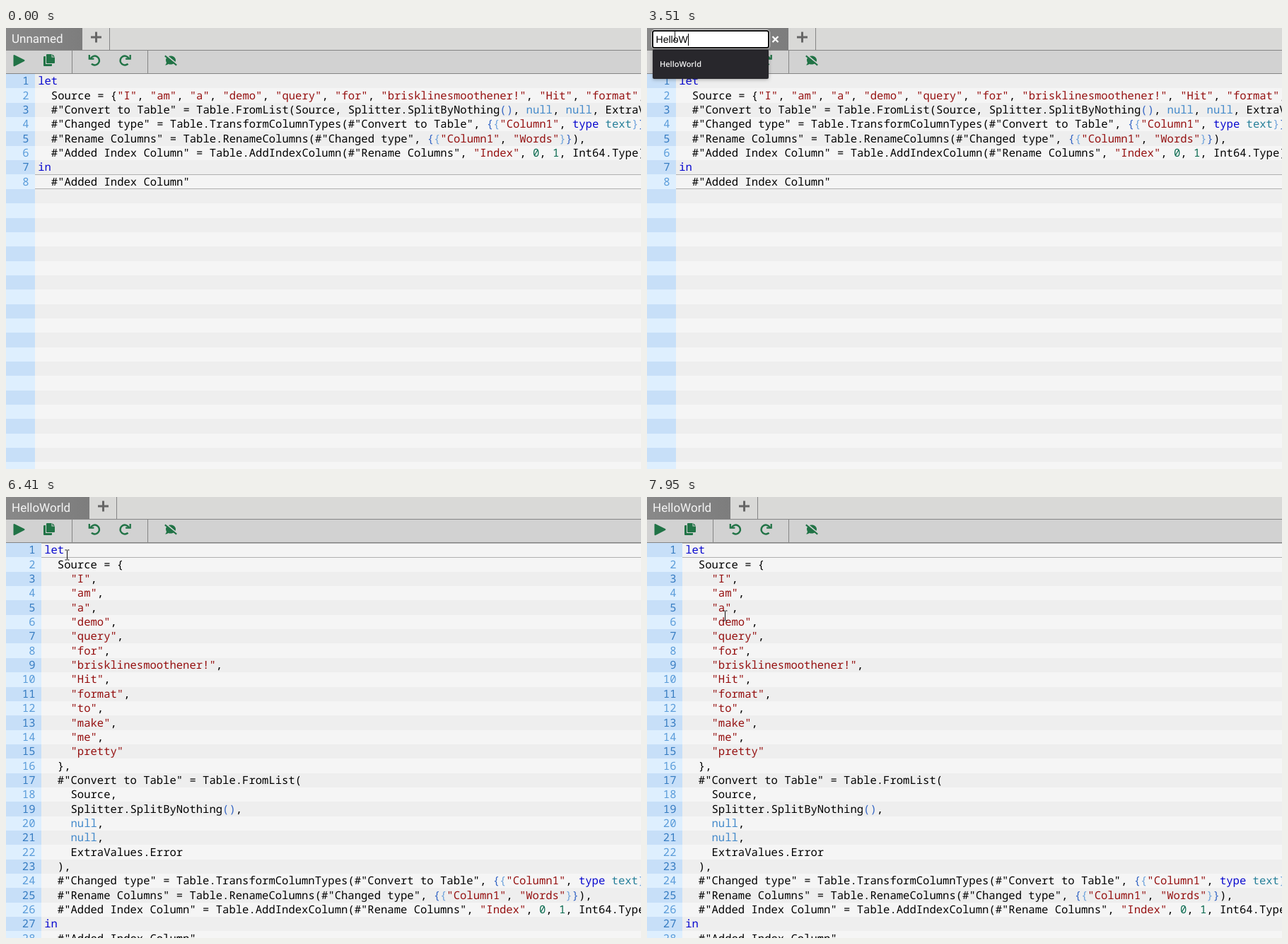
An HTML page with a canvas that plays this animation: 898x624 px, repeating every 8000 ms.

```html
<!DOCTYPE html>
<html lang="en">
<head>
<meta charset="utf-8">
<title>Query editor</title>
<style>
  html, body { margin: 0; width: 100%; height: 100%; overflow: hidden; }
  canvas { display: block; width: 898px; height: 624px; }
</style>
</head>
<body>
<canvas id="stage" width="898" height="624"></canvas>
<script>
const ctx = document.getElementById('stage').getContext('2d');
const LOOP = 8000, W = 898, H = 624;
const ROW = 20.35, TOP = 65, CHAR = 9.33;
const GREEN = '#217346', DARK_GREEN = '#123d26', LINE = '#858585', BAR = '#d2d2d2';
const CODE_FONT = '15.55px "Noto Sans Mono", monospace';
const INPUT_FONT = '14px "Liberation Sans", sans-serif';
const roboto = (size, weight = 400) => `${weight} ${size}px Roboto, sans-serif`;

// ---- Code -------------------------------------------------------------
const words = 'I am a demo query for brisklinesmoothener! Hit format to make me pretty'
  .split(' ').map(w => `"${w}"`);
const steps = [
  '  #"Changed type" = Table.TransformColumnTypes(#"Convert to Table", {{"Column1", type text}}),',
  '  #"Rename Columns" = Table.RenameColumns(#"Changed type", {{"Column1", "Words"}}),',
  '  #"Added Index Column" = Table.AddIndexColumn(#"Rename Columns", "Index", 0, 1, Int64.Type)',
  'in',
  '  #"Added Index Column"'
];
const listArgs = ['Source', 'Splitter.SplitByNothing()', 'null', 'null', 'ExtraValues.Error'];
const listStep = '  #"Convert to Table" = Table.FromList(';
const indent = items => items.map((s, i) => '    ' + s + (i < items.length - 1 ? ',' : ''));
const compact = colorize([
  'let',
  `  Source = {${words.join(', ')}},`,
  `${listStep}${listArgs.join(', ')}),`,
  ...steps
]);
const formatted = colorize([
  'let', '  Source = {', ...indent(words), '  },',
  listStep, ...indent(listArgs), '  ),', ...steps
]);

function colorize(lines) {
  const depthColors = ['#000', '#3465c4', '#6fa3dc'];
  let depth = 0;
  const color = s => {
    if (s[0] === '"') return '#951010';
    if (/^(let|in|type)$/.test(s)) return '#0808cf';
    if (s === 'null') return '#4389ca';
    if (s === 'text') return '#267f99';
    if (/^\d+$/.test(s)) return '#0b6b50';
    if (/^[({]$/.test(s)) return depthColors[depth++];
    if (/^[)}]$/.test(s)) return depthColors[--depth];
    return '#000';
  };
  return lines.map(line => [...line.matchAll(/#?"[^"]*"|\w+|\S/g)]
    .map(m => ({ text: m[0], column: m.index, color: color(m[0]) })));
}

// ---- Drawing helpers --------------------------------------------------
function rect(x, y, w, h, color) {
  ctx.fillStyle = color;
  ctx.fillRect(x, y, w, h);
}
function text(s, x, y, font, color, align = 'left') {
  ctx.font = font;
  ctx.fillStyle = color;
  ctx.textAlign = align;
  ctx.fillText(s, x, y);
}
function fill(path, color) {
  ctx.fillStyle = color;
  ctx.fill(new Path2D(path));
}
function stroke(path, color, width = 1) {
  ctx.strokeStyle = color;
  ctx.lineWidth = width;
  ctx.stroke(new Path2D(path));
}
function panel(x, y, w, h, color, radius = 0) {
  ctx.save();
  ctx.shadowColor = 'rgba(0,0,0,.3)';
  ctx.shadowBlur = 5;
  ctx.shadowOffsetY = 1;
  ctx.fillStyle = color;
  ctx.beginPath();
  ctx.roundRect(x, y, w, h, radius);
  ctx.fill();
  ctx.restore();
}
function faded(alpha, draw) {
  if (alpha <= 0) return;
  ctx.save();
  ctx.globalAlpha = Math.min(1, alpha);
  draw();
  ctx.restore();
}

// ---- Timeline ---------------------------------------------------------
// start, end, from x, y, to x, y; a lone start hides the pointer.
const moves = [
  [70, 830, 540, 532, 62, 46],
  [900, 980, 44, 24, 31, 5],
  [1150, 0, 38, 5],
  [1590, 0, 39.5, 11],
  [4380, 0, 38, 5],
  [4860, 4940, 30, 4, 20, 3],
  [5020],
  [5250, 5410, 20, 44, 28.5, 64],
  [5480, 5640, 27, 60, 20, 47],
  [6100, 6410, 24, 50, 86, 82],
  [6480, 6870, 84, 78, 58, 52],
  [6950, 7030, 58, 51, 57.5, 50],
  [7110, 7330, 66, 72, 99, 159],
  [7480, 0, 100, 153],
  [7730, 0, 103, 148],
  [7950, 0, 110, 168]
];
const keyTimes = [2610, 2760, 2930, 3100, 3270, 3420, 3590, 3720, 3900, 4000];
const NEW_NAME = 'HelloWorld', OLD_NAME = 'Unnamed';

function pointerAt(t) {
  const move = moves.findLast(m => m[0] <= t);
  if (!move || move.length < 2) return null;
  const [a, b, x, y, x2, y2] = move;
  if (!b) return { x, y };
  const n = Math.max(1, Math.round((b - a) / 77));
  const p = Math.min(1, Math.floor((t - a) / (b - a) * n) / n);
  return { x: x + (x2 - x) * p, y: y + (y2 - y) * p };
}

// ---- Parts of the screen ----------------------------------------------
function drawEditor(t) {
  const pretty = t >= 5870;
  const lines = pretty ? formatted : compact;
  const gutter = pretty ? 50 : 41;
  const origin = gutter + 4.2;
  const active = pretty ? 0 : 7;
  for (let i = 0; TOP + i * ROW < H; i++) {
    const y = Math.round(TOP + i * ROW), odd = i % 2 === 0;
    const baseline = Math.round(TOP + 15.3 + i * ROW);
    rect(0, y, gutter, 21, odd ? '#c7dff8' : '#deeffe');
    rect(gutter, y, W, 21, i === active ? '#f4f4f4' : odd ? '#eeeeee' : '#f5f5f5');
    if (!lines[i]) continue;
    text(i + 1, gutter - 8.5, baseline, CODE_FONT, odd ? '#367cc2' : '#5a9cda', 'right');
    for (const token of lines[i])
      text(token.text, origin + token.column * CHAR, baseline, CODE_FONT, token.color);
  }
  const y = Math.round(TOP + active * ROW);
  rect(gutter, y, W, 1, '#b0b0b0');
  rect(gutter, y + 20, W, 1, '#b0b0b0');
  if (t >= 1400 && t < 1590) rect(origin, y + 1, 2, 19, '#000');
}

function drawTabs(t, pointer) {
  const editing = t >= 1590 && t < 4380;
  const end = editing ? 200 : t < 1590 ? 108 : 118;
  rect(0, 0, W, 31, '#d9d9d7');
  const shade = ctx.createLinearGradient(0, 0, end, 0);
  shade.addColorStop(0, '#898989');
  shade.addColorStop(1, '#7d7d7d');
  rect(0, 0, end, 31, shade);
  rect(0, 31, W, 1, LINE);
  rect(end + 38, 0, 1, 31, LINE);
  stroke(`M${end + 12} 13h15m-7.5-7.5v15`, '#666', 3);

  if (editing || (pointer && pointer.y < 31))
    stroke(`M${end - 22.5} 12l8 8m0-8l-8 8`, '#fff', 2.3);
  if (!editing) {
    text(t < 1590 ? OLD_NAME : NEW_NAME, 8, 21, roboto(17), '#f4f4f4');
    return;
  }
  const typed = keyTimes.filter(k => k <= t).length;
  const value = t < 2280 ? OLD_NAME : NEW_NAME.slice(0, typed);
  ctx.beginPath();
  ctx.roundRect(8, 4, 164, 24, 2.5);
  ctx.fillStyle = '#fff';
  ctx.fill();
  ctx.strokeStyle = '#fff';
  ctx.lineWidth = 3.5;
  ctx.stroke();
  ctx.strokeStyle = '#101010';
  ctx.lineWidth = 2;
  ctx.stroke();
  text(value, 12.6, 21, INPUT_FONT, '#000');
  if (t < 2130 || typed)
    rect(Math.round(12.6 + ctx.measureText(value).width), 8, 1, 17, '#000');
}

function drawSuggestions(t) {
  if (t < keyTimes[0] || t >= 4000) return;
  const items = t < 3510 ? [NEW_NAME, 'HelloTables'] : [NEW_NAME];
  panel(8, 30, 164, 14 + 28 * items.length, '#28272c', 2);
  items.forEach((s, i) =>
    text(s, 18, 55 + 28 * i, '600 11px "Open Sans", sans-serif', '#f0f0f0'));
}

function drawTurnArrow(x, flip) {
  ctx.save();
  ctx.translate(x, 46);
  ctx.scale(flip, 1);
  ctx.strokeStyle = GREEN;
  ctx.lineWidth = 2.5;
  ctx.beginPath();
  ctx.arc(0.5, 0, 6.4, -2.65, 2.35);
  ctx.stroke();
  stroke('M-7.2-8v5.7h6.6', GREEN, 2.3);
  ctx.restore();
}

function drawToolbar(pointer) {
  rect(0, 32, W, 32, BAR);
  rect(0, 64, W, 1, LINE);
  rect(93, 32, 1, 32, LINE);
  rect(200, 32, 1, 32, LINE);
  const hover = (x, x2) =>
    pointer && pointer.y > 31 && pointer.y < 65 && pointer.x >= x && pointer.x < x2;
  const iconColor = over => over ? DARK_GREEN : GREEN;

  fill('M10.5 39.2q0-1.9 1.8-1l13.6 6.7q1.6 1 0 2l-13.6 7.2q-1.8.8-1.8-1z', iconColor(hover(0, 40)));

  const copy = iconColor(hover(40, 93));
  fill('M54 40h10q1 0 1 1v12q0 1-1 1h-10q-1 0-1-1v-12q0-1 1-1z', copy);
  rect(56, 36, 14, 15, BAR);
  fill('M58 37h6.5v4.5h4.5v7.5q0 1-1 1h-10q-1 0-1-1v-11q0-1 1-1zM65.5 37l3.5 3.5h-3.5z', copy);

  drawTurnArrow(125, 1);
  drawTurnArrow(168.5, -1);

  fill('M233 39.5c4 0 7 2.7 7 6s-3 6-7 6q-1.9 0-3.4-.6q-2 1.7-4.6 1.7q1.8-1.9 2-3.7q-1-1.5-1-3.4c0-3.3 3-6 7-6z', GREEN);
  stroke('M226 38l16 13.2', BAR, 2);
  stroke('M224.8 39.4l16.4 13.2', GREEN, 2);
}

function drawTooltip() {
  panel(-4, 73, 124, 33, '#d1d1d1', 2);
  text('format', 4, 94, roboto(13.6, 700), '#737373');
  text('(ctrl+enter)', 48, 94, roboto(13.6, 300), '#737373');
}

function drawMenu() {
  panel(40, 65, 232, 121, '#d3d3d3');
  [['Copy Code', 'c', 158], ['Copy HTML', 'h', 164], ['Copy Query', 'p', 162]]
    .forEach(([label, key, x], i) => {
      const y = 95 + 35 * i;
      text(label, 82, y, roboto(15.2, 300), '#4c4c4c');
      text(`(ctrl+alt+${key})`, x, y - 1, roboto(12, 300), '#5c5c5c');
    });
  stroke('M57 84.5h9m-9 4h14m-14 4h9m-9 4h14', '#383838', 1.8);
  stroke('M61.5 121l-3.8 4l3.8 4m6-8l3.8 4l-3.8 4m-1.6-10l-2.8 12', '#383838', 1.7);
  fill('M57 153h15v3.5h-15zM58 157.5h13v8.5h-13zM62 159v1.3h5v-1.3z', '#333');
}

function drawPointer(t, pointer) {
  if (!pointer) return;
  const overMenu = t >= 6950 && t < 7950;
  const overInput = t >= 1590 && t < 4380;
  ctx.save();
  ctx.translate(pointer.x, pointer.y);
  if (overInput || (pointer.y > 65 && !overMenu)) {
    ctx.translate(Math.floor(pointer.x) + .5 - pointer.x, 0);
    stroke('M0-6.5v13M-3-7h2.5M.5-7h2.5M-3 7h2.5M.5 7h2.5', '#111');
  } else {
    const hand = 'M-1.6 11V1.6Q-1.6 0 0 0T1.6 1.6V6.5Q3 5.3 4.4 6.8Q6 6 7 7.6Q9 7.2 9 9.5V13' +
      'Q9 16 7.5 18.5H-.5Q-1.5 16-4.8 12Q-5.2 9.6-3.6 9.6Z';
    fill(hand, '#fff');
    stroke(hand + 'M1.6 6.5V10M4.4 6.8V10M7 7.6V10.5', '#111', 1.1);
  }
  ctx.restore();
}

function draw(t) {
  const pointer = pointerAt(t);
  ctx.textRendering = 'geometricPrecision';
  drawEditor(t);
  drawTabs(t, pointer);
  drawToolbar(pointer);
  drawSuggestions(t);
  faded(Math.min((t - 5200) / 200, (6350 - t) / 150), drawTooltip);
  if (t >= 6950 && t < 7800) faded(t < 7730 ? 1 : 0.5, drawMenu);
  drawPointer(t, pointer);
}

function frame() {
  draw(performance.now() % LOOP);
  requestAnimationFrame(frame);
}
frame();
</script>
</body>
</html>
```
